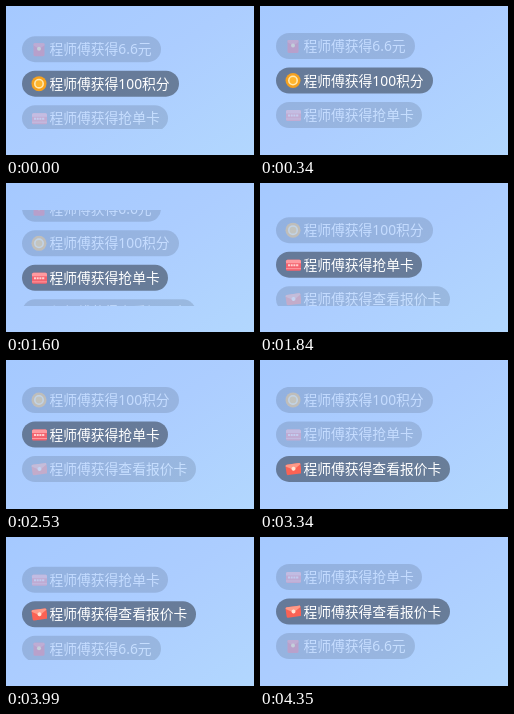
Recreate the animation shown at these times as an HTML page. Size 248 by 149 pixels, loop 4580 ms.

```html
<!DOCTYPE html>
<html lang="zh-CN">
<head>
<meta charset="utf-8">
<style>
html, body { margin: 0; width: 100%; height: 100%; overflow: hidden; }
body { position: relative; background: linear-gradient(145deg, #a5c9ff, #accdff 50%, #b2d7fe); }
#list { position: absolute; left: 16px; top: 27px; width: 220px; height: 96px; overflow: hidden; }
.pill {
  position: absolute; left: 0; top: -.5px; height: 26px; box-sizing: border-box; padding-left: 27.4px;
  border-radius: 13px; background: rgba(0, 0, 0, .4); color: #fff; white-space: nowrap;
  font: 500 13.8px/26px "Noto Sans", "Noto Sans CJK SC", "Noto Sans CJK", sans-serif;
}
.pill svg { position: absolute; left: 9px; top: 5px; width: 16px; height: 16px; }
</style>
</head>
<body>
<div id="list"></div>
<script>
const LOOP = 4580, FIRST = -635, STEP = 1985, MOVE = 1000, PITCH = 34.5, DIM = .3;

const icons = {
  envelope: `<rect x="2.500" y="2" width="11" height="13" rx="1.500" fill="#dc3f55"/>
    <path d="M2.500 4Q8 9 13.500 4V3a1 1 0 0 0-1-1h-9a1 1 0 0 0-1 1z" fill="#ee6673"/>
    <circle cx="8" cy="7.500" r="2" fill="#ffd98a"/>`,
  coin: `<circle cx="8" cy="8" r="7.500" fill="#f5a11f"/>
    <circle cx="8" cy="8" r="4.200" fill="#ffb52e" stroke="#ffe9b0" stroke-width="1.600"/>`,
  ticket: `<rect x="1" y="3" width="15" height="11" rx="1.500" fill="#f4636f"/>
    <path d="M1 6.500v-2Q1 3 2.500 3h12Q16 3 16 4.500v2z" fill="#ff9aa0"/>
    <path d="M3 8.500h11" stroke="#ffd0d0" stroke-width="2" stroke-dasharray="2 .7"/>
    <path d="M1 12h15" stroke="#ff9aa0"/>`,
  coupon: `<g transform="rotate(-8 8 8)"><rect x="1" y="3" width="15" height="10.500" rx="1.500" fill="#fb6254"/>
    <path d="M1 4.500Q1 3 2.500 3h12Q16 3 16 4.500L8.500 9z" fill="#ff9a88"/>
    <circle cx="8.500" cy="8" r="2" fill="#ffe6d6"/></g>`
};
const items = [
  ['envelope', '6.6元', 139],
  ['coin', '100积分', 157],
  ['ticket', '抢单卡', 146],
  ['coupon', '查看报价卡', 174]
];
const list = document.getElementById('list');
const pills = items.map(([icon, prize, width]) => {
  const el = document.createElement('div');
  el.className = 'pill';
  el.style.width = width + 'px';
  el.innerHTML = `<svg viewBox="0 0 16 16">${icons[icon]}</svg>程师傅获得${prize}`;
  return list.appendChild(el);
});

// cubic-bezier(.25, .1, .25, 1)
function ease(x) {
  if (x >= 1) return 1;
  let lo = 0, hi = 1;
  const at = (s, a, b) => 3 * (1 - s) ** 2 * s * a + 3 * (1 - s) * s * s * b + s ** 3;
  for (let i = 0; i < 20; i++) {
    const mid = (lo + hi) / 2;
    if (at(mid, .25, .25) < x) lo = mid; else hi = mid;
  }
  return at(lo, .1, 1);
}

function draw(now) {
  const t = now % LOOP - FIRST;
  const step = Math.floor(t / STEP);
  const moved = ease((t - step * STEP) / MOVE);
  for (let row = 0; row < 4; row++) {
    const { style } = pills[(step + row + 3) % 4];
    style.transform = `translateY(${(row - moved) * PITCH}px)`;
    style.opacity = row === 2 ? 1 : DIM;
  }
}

const start = performance.now();
function tick() {
  draw(performance.now() - start);
  requestAnimationFrame(tick);
}
tick();
</script>
</body>
</html>
```
